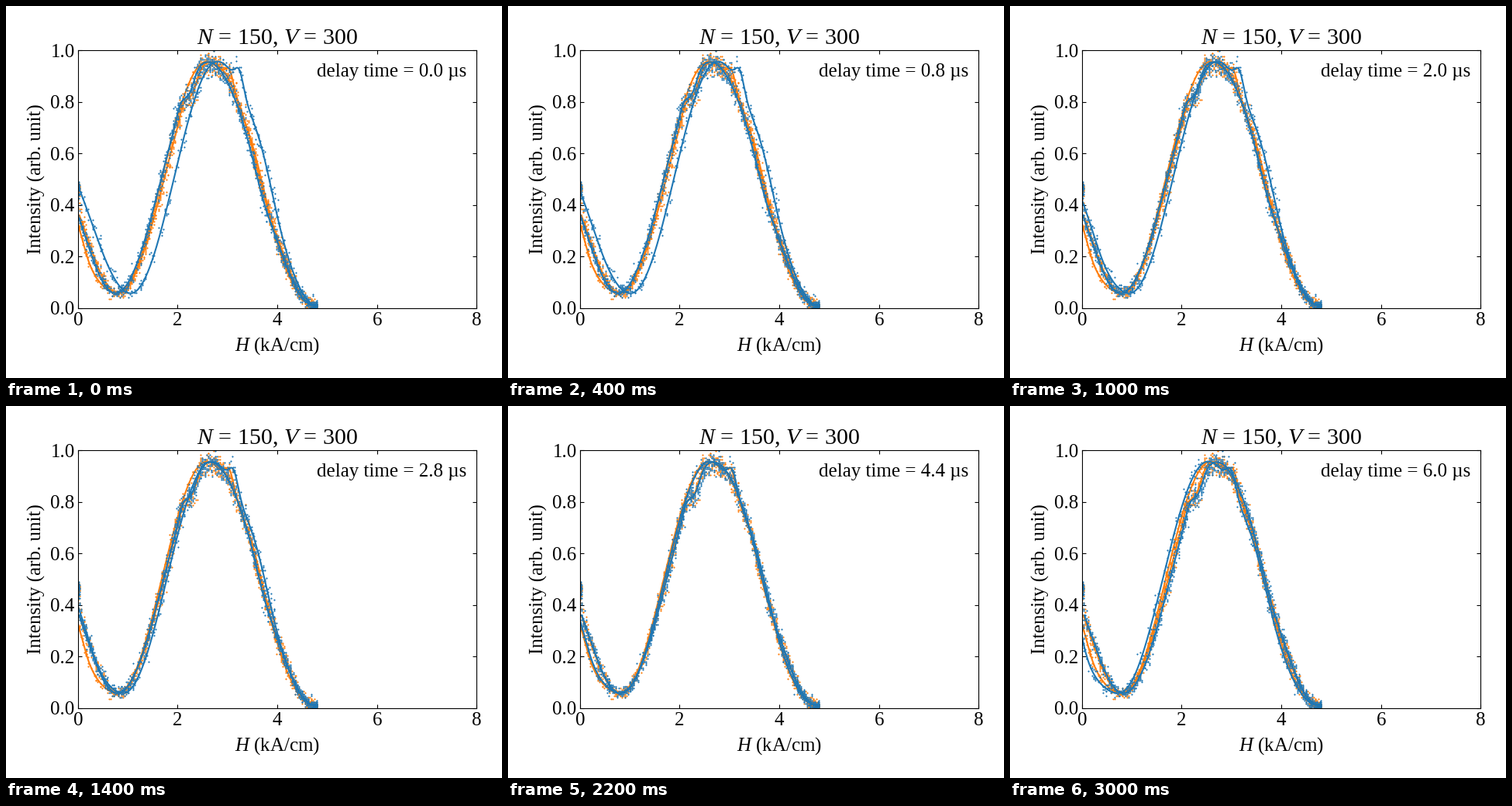
These frames come from a looping animation (640 by 480 pixels, 3.1 s). A matplotlib script:

```python
import numpy as np
import matplotlib.pyplot as plt
from matplotlib.animation import FuncAnimation

plt.rcParams.update({
    "font.family": "Liberation Serif",
    "font.size": 18,
    "mathtext.fontset": "custom",
    "mathtext.rm": "Liberation Serif",
    "mathtext.it": "Liberation Serif:italic",
})

FRAMES, INTERVAL, STEP = 31, 100, 0.2
BLUE, ORANGE = "tab:blue", "tab:orange"
H_MAX = 4.8
rng = np.random.default_rng(7)


def bump(h, centre, width, height):
    return height * np.exp(-((h - centre) / width) ** 2)


def wave(h, extrema):
    """Half cosines from one turning point to the next."""
    (x, y) = np.array(extrema).T
    k = np.clip(np.searchsorted(x, h) - 1, 0, len(x) - 2)
    t = np.clip((h - x[k]) / (x[k + 1] - x[k]), 0, 1)
    return y[k] + (y[k + 1] - y[k]) * (1 - np.cos(np.pi * t)) / 2


# Intensity against field at zero delay, on the way up and down
def rise_curve(h):
    return (wave(h, [(-.5, .6), (1.06, .058), (2.8, .957), (H_MAX, .01)])
            + bump(h, 3.24, .12, .07) + bump(h, 3.7, .3, .055))


def fall_curve(h):
    return (wave(h, [(-.5, .52), (.75, .058), (2.6, .955), (4.75, .012)])
            + bump(h, 2.04, .08, .02) + bump(h, 2.25, .12, -.04)
            + bump(h, 3.7, .25, -.035))


# The field moves on during the delay: fast on the way up, slow on the way down
def rise_shift(h, delay):
    speed = .055 * np.sqrt(np.clip(1 - (h / H_MAX) ** 2, 0, 1))
    return h - delay * (speed + bump(h, .65, .3, .02))


def fall_shift(h, delay):
    u = h / H_MAX
    return h + delay * (1 - u) * (.008 + .05 * u)


def cloud(curve, count):
    """Noisy samples: true field, field error, intensity."""
    h = H_MAX * (1 - rng.random(count) ** 1.25)
    i = curve(h)
    i = i + rng.normal(0, 1, count) * (.009 + .014 * i)
    i = np.clip(np.round(i / .006) * .006, .004, .997)
    return h, rng.normal(0, .025, count), i


def make_clouds():
    rest = rng.uniform(0, .035, 24), rng.normal(.47, .014, 24)
    return cloud(rise_curve, 340), cloud(fall_curve, 1050), rest


def scatter_xy(clouds, rise_delay, fall_delay):
    (h_up, err_up, i_up), (h_down, err_down, i_down), (h_rest, i_rest) = clouds
    up = np.maximum(rise_shift(h_up, rise_delay), 0) + err_up
    down = fall_shift(h_down, fall_delay) + err_down
    x = np.minimum(np.abs(np.concatenate([up, down])), H_MAX)
    x = np.round(x / .03) * .03
    return np.concatenate([x, h_rest]), np.concatenate([i_up, i_down, i_rest])


grid = np.linspace(0, H_MAX, 500)

fig = plt.figure(figsize=(6.4, 4.8), dpi=100, facecolor="white")
ax = fig.add_axes([92.9 / 640, 90 / 480, 514.3 / 640, 332.7 / 480])
ax.set(xlim=(0, 8), ylim=(0, 1), xticks=range(0, 9, 2),
       yticks=np.arange(6) / 5)
ax.tick_params(direction="in", top=True, right=True)
ax.tick_params(axis="y", pad=3)
ax.set_title("$N$ = 150, $V$ = 300")
fig.text(350 / 640, 35 / 480, "$H$ (kA/cm)", ha="center", va="baseline")
fig.text(46 / 640, 256.5 / 480, "Intensity (arb. unit)", rotation=90,
         rotation_mode="anchor", ha="center", va="baseline")
label = ax.text(.6, .9, "", transform=ax.transAxes)


def add_series(color):
    dots, = ax.plot([], [], "+", color=color, ms=1.8, mew=.85)
    rise, = ax.plot([], [], color=color, lw=1.5)
    fall, = ax.plot([], [], color=color, lw=1.5)
    return dots, rise, fall


def place(series, clouds, rise_delay, fall_delay):
    dots, rise, fall = series
    dots.set_data(*scatter_xy(clouds, rise_delay, fall_delay))
    rise.set_data(rise_shift(grid, rise_delay), rise_curve(grid))
    fall.set_data(fall_shift(grid, fall_delay), fall_curve(grid))


slow, fast = add_series(ORANGE), add_series(BLUE)
slow_clouds, fast_clouds = make_clouds(), make_clouds()
place(slow, slow_clouds, 4.8, 3.6)


def update(n):
    delay = n * STEP
    place(fast, fast_clouds, delay, delay)
    label.set_text(f"delay time = {delay:.1f} µs")
    return (*fast, label)


anim = FuncAnimation(fig, update, frames=FRAMES, interval=INTERVAL,
                     init_func=lambda: update(0), repeat=True)
plt.show()
```
